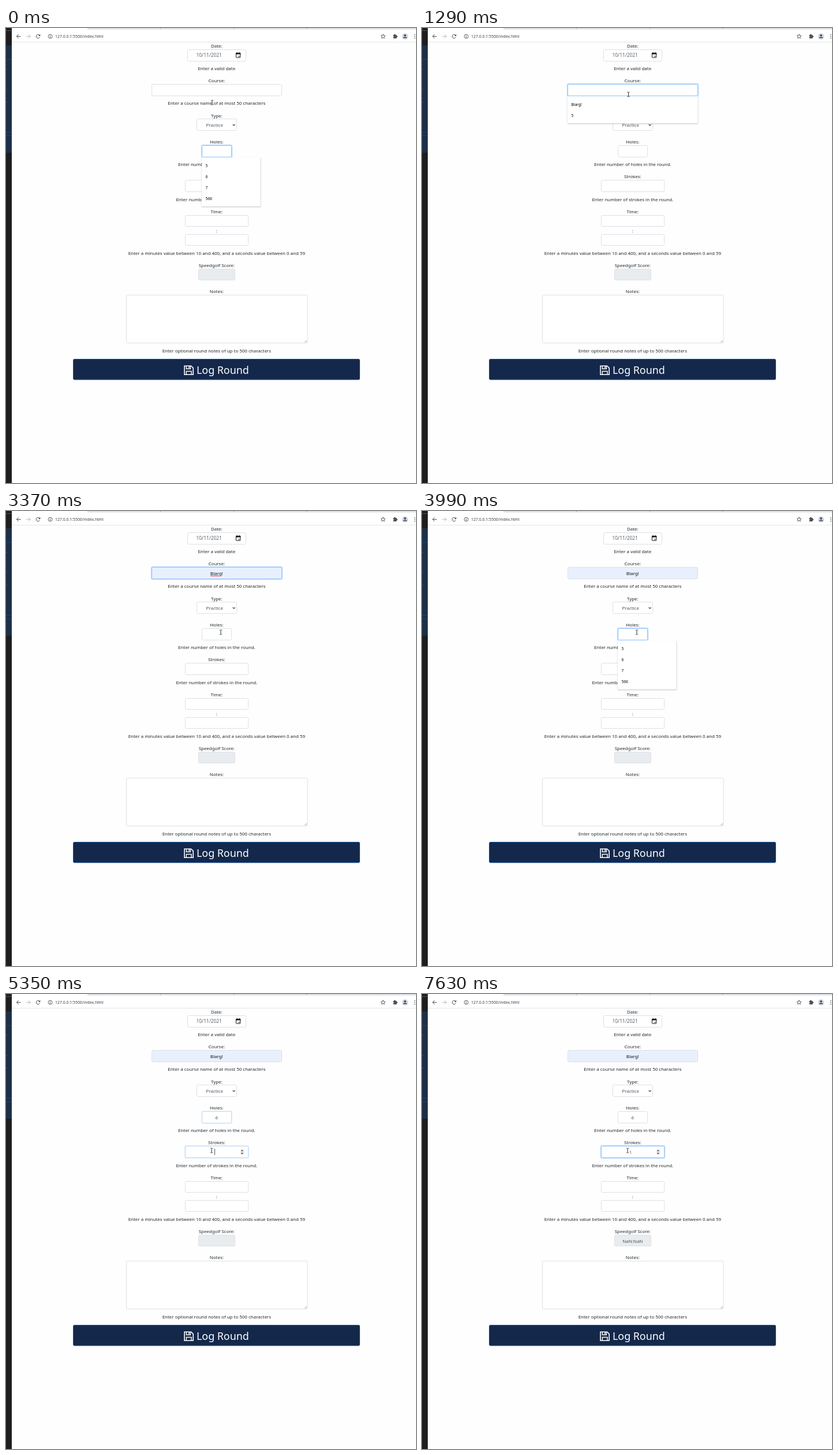
These frames come from a looping animation (710x788 px, 8 s). An HTML page with a canvas:

```html
<!DOCTYPE html>
<html lang="en">
<head>
<meta charset="utf-8">
<title>Log Round</title>
<style>
  html, body { margin: 0; width: 100%; height: 100%; overflow: hidden; background: #fff; }
  canvas { display: block; width: 710px; height: 788px; }
</style>
</head>
<body>
<canvas id="stage" width="710" height="788"></canvas>
<script>
const g = document.getElementById('stage').getContext('2d');
const LOOP = 8000, MID = 364.8;
const INK = '#212529', FIELD = '#495057', EDGE = '#dce0e5', FILLED = '#e8f0fe', PAGE = '#fefefe';

const COURSE = { x: 252, y: 97, w: 226 };
const HOLES = { x: 339, y: 203, w: 52 };
const STROKES = { x: 310, y: 263, w: 110 };

const holesMenu = { x: 339, y: 224, w: 101.5, items: ['5', '6', '7', '566'] };
const courseMenu = { x: 252, y: 118, w: 225.7, items: ['Blarg!', '5'] };
const strokesMenu = { x: 310, y: 284, w: 109.7, items: ['7', '6', '5', '3'] };

// Each entry changes part of the state from its time on.
const steps = [
  [0, { arrow: false, px: 357, py: 129, holesRing: 1, courseRing: 0, strokesRing: 0,
        menu: holesMenu, fade: 1, hover: -1, caret: null, course: '', preview: false,
        spell: false, holes: '', strokes: '', spin: false, score: '' }],
  [250, { py: 126, caret: [365, 208] }],
  [370, { py: 121.5 }],
  [510, { px: 357.5, py: 117, fade: 0.25, holesRing: 0.4, caret: null }],
  [630, { py: 115, menu: null, holesRing: 0 }],
  [780, { menu: courseMenu, fade: 1, courseRing: 0.35, caret: [365, 102] }],
  [920, { courseRing: 1 }],
  [1290, { caret: null }],
  [1850, { caret: [365, 102] }],
  [2350, { caret: null, px: 355, py: 118 }],
  [2470, { arrow: true, px: 350, py: 123, hover: 0, course: 'Blarg!', preview: true }],
  [2590, { px: 346, py: 123 }],
  [2840, { preview: false, hover: -1, fade: 0.25 }],
  [2990, { menu: null, px: 351, py: 150 }],
  [3110, { px: 362, py: 177 }],
  [3250, { px: 369, py: 194, spell: true }],
  [3370, { arrow: false, px: 372, py: 210 }],
  [3490, { spell: false, courseRing: 0.35, holesRing: 0.4, caret: [365, 208] }],
  [3610, { courseRing: 0, holesRing: 1, menu: holesMenu, fade: 1 }],
  [3990, { caret: null }],
  [4360, { holes: '6', caret: [367, 208], fade: 0.25 }],
  [4480, { menu: null, px: 370, py: 216 }],
  [4600, { arrow: true, px: 364, py: 238 }],
  [4720, { px: 359, py: 253, spin: true }],
  [4840, { px: 357, py: 260 }],
  [4960, { arrow: false, px: 356, py: 268 }],
  [5080, { py: 271 }],
  [5350, { holesRing: 0.3, strokesRing: 0.4, caret: [361, 268] }],
  [5470, { holesRing: 0, strokesRing: 1, menu: strokesMenu, fade: 1 }],
  [5840, { caret: null }],
  [6490, { caret: [361, 268] }],
  [6890, { caret: null }],
  [7140, { strokes: '1', caret: [363, 268], fade: 0.25 }],
  [7260, { menu: null, score: 'NaN:NaN' }],
  [7630, { caret: null }]
];

function stateAt(t) {
  const s = {};
  for (const [from, patch] of steps) if (from <= t) Object.assign(s, patch);
  return s;
}

function text(str, x, y, size = 7.95, color = INK, align = 'center') {
  g.font = size + 'px "Noto Sans", "Open Sans", sans-serif';
  g.textAlign = align;
  g.fillStyle = color;
  g.fillText(str, x, y);
}

function rect(x, y, w, h, color) {
  g.fillStyle = color;
  g.fillRect(x, y, w, h);
}

function line(points, color, width = 1, close = false) {
  g.beginPath();
  for (let i = 0; i < points.length; i += 2) g.lineTo(points[i], points[i + 1]);
  if (close) g.closePath();
  g.strokeStyle = color;
  g.lineWidth = width;
  g.stroke();
}

function poly(points, color) {
  g.beginPath();
  for (let i = 0; i < points.length; i += 2) g.lineTo(points[i], points[i + 1]);
  g.fillStyle = color;
  g.fill();
}

function arc(x, y, r, color, from = 0, to = 7, width = 1) {
  g.beginPath();
  g.arc(x, y, r, from, to);
  g.strokeStyle = color;
  g.lineWidth = width;
  g.stroke();
}

function disc(x, y, r, color) {
  g.beginPath();
  g.arc(x, y, r, 0, 7);
  g.fillStyle = color;
  g.fill();
}

function box(x, y, w, h, fill = '#fff', edge = EDGE) {
  g.beginPath();
  g.roundRect(x + 0.5, y + 0.5, w - 1, h - 1, 2);
  g.fillStyle = fill;
  g.fill();
  g.strokeStyle = edge;
  g.lineWidth = 1;
  g.stroke();
}

function field(f, ring = 0, fill = '#fff') {
  const { x, y, w } = f, h = 21;
  box(x, y, w, h, fill);
  if (!ring) return;
  g.globalAlpha = ring;
  g.beginPath();
  g.roundRect(x - 0.4, y - 0.4, w + 0.8, h + 0.8, 2.5);
  g.strokeStyle = '#bfdeff';
  g.lineWidth = 1.7;
  g.stroke();
  box(x, y, w, h, fill, '#8fc3fc');
  g.globalAlpha = 1;
}

function sideStrip() {
  rect(0, 0, 10, 788, '#1e1e1e');
  rect(0, 30, 10, 186, '#1d3047');
  for (const y of [54, 180, 186]) rect(0, y, 10, 1, '#1d456f');
  for (const y of [71, 106, 128]) rect(0, y, 3, 1, '#234a72');
  for (const x of [1, 4, 7]) rect(x, 4, 1, 1, '#c5c5c5');
}

function toolbar() {
  rect(10, 0, 700, 24, '#fff');
  rect(141, 0, 569, 2.5, '#dee1e6');
  for (const x of [267, 394, 520]) rect(x, 0, 1, 2, '#a9adb2');
  rect(10, 24, 700, 1, '#e4e6e8');

  const dark = '#4c5054', pale = '#b9bbbe';
  line([25.5, 14.5, 18.5, 14.5], dark);
  line([21.8, 11, 18.3, 14.5, 21.8, 18], dark);
  line([35, 14.5, 42, 14.5], pale);
  line([38.7, 11, 42.2, 14.5, 38.7, 18], pale);
  arc(55.5, 14.5, 3.3, dark, 0.4, 5.5);
  poly([59.3, 10.5, 59.3, 14, 55.8, 14], dark);
  arc(76.5, 14.5, 3.4, dark, 0, 7, 0.9);
  rect(76, 14, 1, 2.6, dark);
  rect(76, 12.3, 1, 1, dark);
  text('127.0.0.1:5500/index.html', 85, 17, 6.9, '#3c4043', 'left');

  const star = [];
  for (let i = 0; i < 10; i++) {
    const r = i % 2 ? 1.8 : 4, a = i * Math.PI / 5 - Math.PI / 2;
    star.push(653 + r * Math.cos(a), 14.6 + r * Math.sin(a));
  }
  line(star, dark, 0.9, true);
  rect(670.5, 12, 6, 6, dark);
  disc(673.3, 11.7, 1.3, dark);
  disc(676.8, 14.8, 1.3, dark);
  disc(670.7, 15.2, 1, '#fff');
  disc(691, 14.4, 5.3, '#d3d7e6');
  disc(691, 12.8, 1.9, '#46495c');
  g.beginPath();
  g.ellipse(691, 17.6, 3.5, 2, 0, Math.PI, 0);
  g.fill();
  for (const y of [11, 14, 17]) rect(707.3, y, 1.3, 1.4, dark);
}

function calendar() {
  g.beginPath();
  g.roundRect(398.4, 43.4, 7.4, 7.8, 0.8);
  g.strokeStyle = '#111';
  g.lineWidth = 1;
  g.stroke();
  rect(398, 43, 8.2, 2.5, '#111');
  rect(399.6, 42, 1, 1.5, '#111');
  rect(403.8, 42, 1, 1.5, '#111');
  rect(402.6, 48.3, 1.8, 1.6, '#333');
}

function logButton() {
  box(116, 573, 497, 36.5, '#14284b', '#1257a8');
  text('Log Round', 330, 599, 17.85, '#fff', 'left');
  line([309, 585.2, 320.5, 585.2, 324.2, 588.9, 324.2, 600.2, 309, 600.2], '#fff', 1.6, true);
  line([312.3, 586, 312.3, 590.3, 319.4, 590.3, 319.4, 586], '#fff', 1.4);
  rect(316.3, 586, 1.6, 3, '#fff');
  line([312.3, 600, 312.3, 594.5, 321, 594.5, 321, 600], '#fff', 1.4);
}

function form(s) {
  const labels = [['Date:', 34], ['Course:', 94], ['Type:', 154.6], ['Holes:', 200],
    ['Strokes:', 260.4], ['Time:', 320.8], [':', 353.6], ['Speedgolf Score:', 414], ['Notes:', 459.3]];
  const hints = [['Enter a valid date', 73], ['Enter a course name of at most 50 characters', 133.4],
    ['Enter number of holes in the round.', 239.2], ['Enter number of strokes in the round.', 299.6],
    ['Enter a minutes value between 10 and 400, and a seconds value between 0 and 59', 392.8],
    ['Enter optional round notes of up to 500 characters', 562]];
  for (const [str, y] of labels.concat(hints)) text(str, MID, y);

  box(314, 37, 102, 21);
  text('10/11/2021', 329.5, 50.4, 8.35, '#5c636a', 'left');
  calendar();

  field(COURSE, s.courseRing, s.course ? FILLED : '#fff');
  if (s.course) {
    if (s.preview) text(s.course, MID, 110.8, 6.85, '#000');
    else text(s.course, MID, 111, 7.95, '#111');
  }
  if (s.spell) rect(354, 112, 18.5, 1, '#f03a3a');

  box(330, 157, 70, 21);
  text('Practice', 361.2, 171.3, 7.95, FIELD);
  line([392.6, 166.8, 394.6, 168.9, 396.6, 166.8], '#333', 1.1);

  field(HOLES, s.holesRing);
  text(s.holes, MID, 216.7, 7.95, FIELD);

  field(STROKES, s.strokesRing);
  text(s.strokes, 361, 277, 7.95, FIELD);
  if (s.spin) {
    rect(405, 268, 8, 11, '#f1f1f1');
    poly([406.8, 272.3, 408.9, 269.8, 411, 272.3], '#444');
    poly([406.8, 275, 408.9, 277.5, 411, 275], '#444');
  }

  box(310, 324, 110, 20);
  box(310, 357, 110, 20);
  box(333, 417, 64, 20, '#e9ecef');
  text(s.score, MID, 430.5, 7.95, FIELD);

  box(208, 462, 314.5, 84);
  line([517, 544.5, 521, 540.5], '#888', 0.7);
  line([519.3, 544.5, 521, 542.8], '#888', 0.7);
  logButton();
}

function menu(m, fade, hover) {
  const h = 28 + 19 * (m.items.length - 1), inset = fade < 1 ? 4 : 0;
  g.save();
  g.globalAlpha = fade;
  g.shadowColor = 'rgba(0,0,0,0.24)';
  g.shadowBlur = 2;
  g.shadowOffsetY = 0.5;
  rect(m.x + inset, m.y + inset, m.w - 2 * inset, h - 2 * inset, '#fff');
  g.shadowColor = 'transparent';
  m.items.forEach((item, i) => {
    const y = m.y + 14 + 19 * i;
    if (i === hover) rect(m.x, y - 9.5, m.w, 19, '#e8e8e8');
    text(item, m.x + 6.4, y + 2.5, 6.6, '#000', 'left');
  });
  g.restore();
}

function pointer(s) {
  g.save();
  g.translate(s.px, s.py);
  if (s.arrow) {
    const shape = [0.4, 0.3, 0.4, 8.1, 2.2, 6.5, 3.5, 9.4, 4.8, 8.8, 3.5, 6, 5.9, 5.9];
    poly(shape, '#fff');
    line(shape, '#222', 0.8, true);
  } else {
    rect(-0.5, -4, 1, 8, '#333');
    for (const y of [-4.3, 3.4]) {
      rect(-2.2, y, 1.8, 0.9, '#444');
      rect(0.4, y, 1.8, 0.9, '#444');
    }
  }
  g.restore();
}

function draw(t) {
  const s = stateAt(t);
  rect(0, 0, 710, 788, PAGE);
  sideStrip();
  toolbar();
  form(s);
  if (s.menu) menu(s.menu, s.fade, s.hover);
  if (s.caret) rect(s.caret[0], s.caret[1], 1, 11, '#555b61');
  pointer(s);
}

const start = performance.now();
function tick() {
  draw((performance.now() - start) % LOOP);
  requestAnimationFrame(tick);
}
tick();
</script>
</body>
</html>
```
